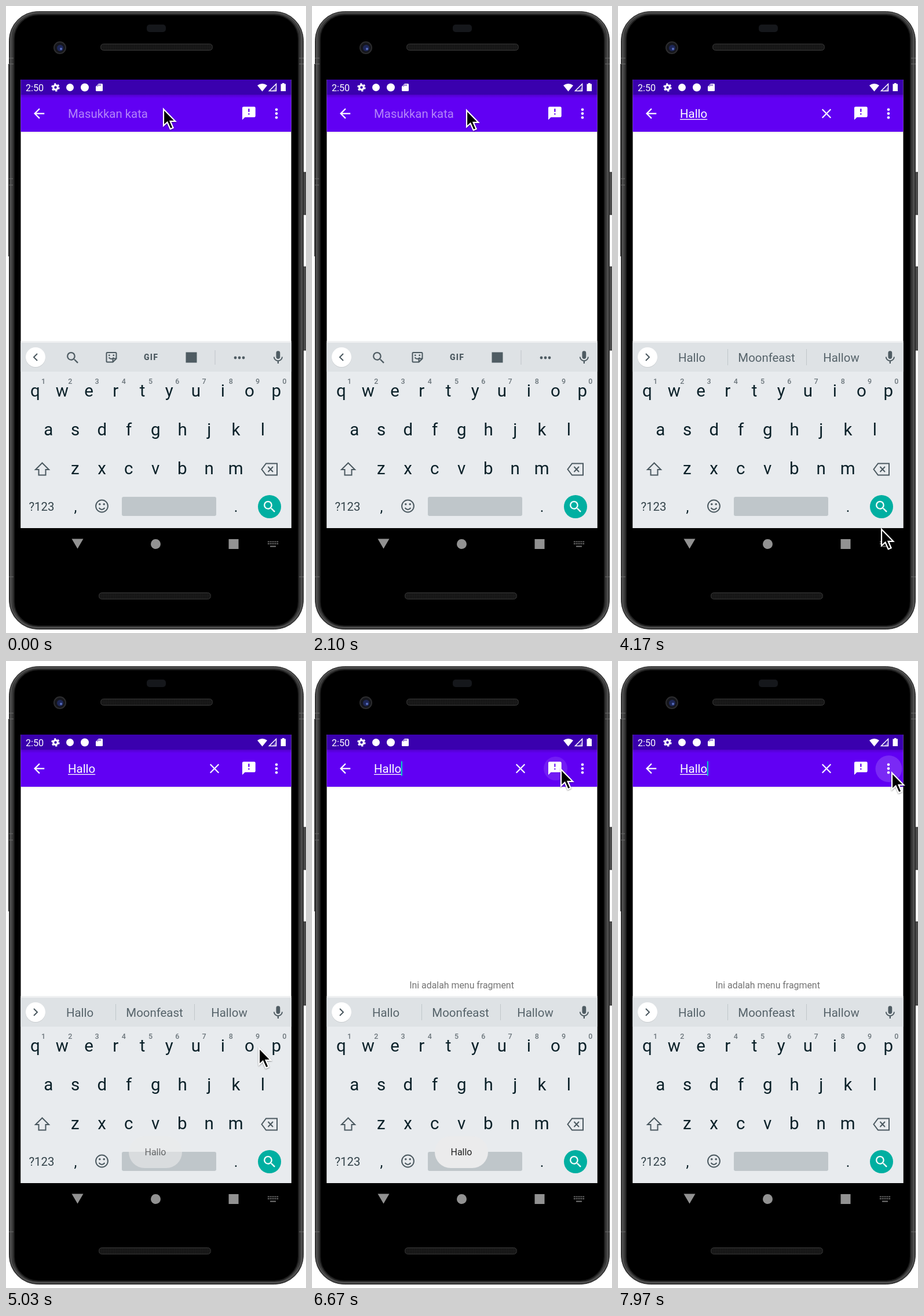
An HTML page that plays this animation: 518x1082 px, repeating every 8 s.

```html
<!DOCTYPE html>
<html lang="id">
<head>
<meta charset="utf-8">
<title>Search menu demo</title>
<style>
html, body { margin: 0; width: 100%; height: 100%; overflow: hidden; background: #fff; }
svg { display: block; width: 518px; height: 1082px; font-family: Roboto, sans-serif; }
.mid { text-anchor: middle; }
.key { font-size: 29.5px; fill: #0b2129; text-anchor: middle; }
.num { font-size: 12.5px; font-weight: 500; fill: #6b757b; text-anchor: middle; }
.sug { font-size: 20.4px; fill: #56636a; text-anchor: middle; }
.line { fill: none; stroke: #4b5960; stroke-width: 2; }
.ico { fill: #4f5c63; }
</style>
</head>
<body>
<svg viewBox="0 0 518 1082" xmlns="http://www.w3.org/2000/svg">
  <defs>
    <linearGradient id="side" x1="5" x2="514" y1="0" y2="0" gradientUnits="userSpaceOnUse">
      <stop offset="0" stop-color="#191919"/><stop offset=".006" stop-color="#4c4c4c"/>
      <stop offset=".014" stop-color="#333"/><stop offset=".02" stop-color="#3c3c3c"/>
      <stop offset=".98" stop-color="#3c3c3c"/><stop offset=".986" stop-color="#333"/>
      <stop offset=".994" stop-color="#4c4c4c"/><stop offset="1" stop-color="#191919"/>
    </linearGradient>
    <linearGradient id="shade" x1="0" x2="0" y1="0" y2="1">
      <stop offset="0" stop-color="#000" stop-opacity=".16"/><stop offset="1" stop-color="#000" stop-opacity="0"/>
    </linearGradient>
    <pattern id="mesh" width="3" height="3" patternUnits="userSpaceOnUse">
      <rect width="3" height="3" fill="#1b1b1b"/><circle cx="1.5" cy="1.5" r=".8" fill="#0a0a0a"/>
    </pattern>
    <path id="glass" d="M15.5 14h-.79l-.28-.27A6.47 6.47 0 0 0 16 9.5 6.5 6.5 0 1 0 9.5 16c1.61 0 3.09-.59 4.23-1.57l.27.28v.79l5 4.99L20.49 19l-4.99-5zm-6 0a4.5 4.5 0 1 1 0-9 4.5 4.5 0 0 1 0 9z"/>
  </defs>

  <!-- phone -->
  <rect x="511" y="287" width="9" height="73" rx="2" fill="#4b4b4b" stroke="#222"/>
  <rect x="511" y="450" width="9" height="144" rx="2" fill="#4b4b4b" stroke="#222"/>
  <rect x="4" y="100" width="3" height="332" fill="#2c2c2c"/>
  <rect x="5.5" y="9.5" width="508" height="1066" rx="50" fill="url(#side)" stroke="#2a2a2a"/>
  <rect x="8" y="11.5" width="503" height="1061" rx="47" fill="none" stroke="#565656" stroke-width="1.5"/>
  <path d="M5 90h8M5 100h8M506 90h8M506 100h8M5 298h7M5 309h7M5 985h8M506 985h8" stroke="#6d6d6d"/>
  <rect x="14" y="15" width="491" height="1055" rx="42" stroke="#1d1d1d" stroke-width="2"/>
  <rect x="243" y="32" width="33" height="13" rx="5" fill="#15171b"/>
  <rect x="163.500" y="65.500" width="193" height="11" rx="5" fill="url(#mesh)" stroke="#373737"/>
  <rect x="160.500" y="1012.500" width="193" height="11" rx="5" fill="url(#mesh)" stroke="#373737"/>
  <circle cx="93" cy="72" r="10" fill="#15161c" stroke="#2c2c2e" stroke-width="2"/>
  <circle cx="93.500" cy="72.500" r="5.500" fill="#1e2757"/>
  <circle cx="95" cy="74" r="2" fill="#5a6fc0"/>

  <!-- app -->
  <rect x="25.500" y="127" width="467" height="774" fill="#fff"/>
  <rect x="25.500" y="153" width="467" height="64" fill="#6100f3"/>
  <rect x="25.500" y="127" width="467" height="26" fill="#3a00ae"/>
  <rect x="25.500" y="153" width="467" height="6" fill="url(#shade)"/>
  <rect x="25.500" y="217" width="467" height="3" fill="url(#shade)" opacity=".5"/>
  <text x="34" y="146.500" font-size="16.200" fill="#fff">2:50</text>
  <g fill="#fff">
    <circle cx="85.500" cy="140.500" r="3.800" fill="none" stroke="#fff" stroke-width="3.200"/>
    <circle cx="85.500" cy="140.500" r="6.200" fill="none" stroke="#fff" stroke-width="2" stroke-dasharray="3.250 3.243"/>
    <circle cx="110.500" cy="140.500" r="6.500"/>
    <circle cx="136" cy="140.500" r="7"/>
    <path d="M160 134h5.500q1.500 0 1.500 1.500v10q0 1.500-1.500 1.500h-9q-1.500 0-1.500-1.500v-6.500z"/>
    <path d="M434 137q8.500-6 17 0l-8.500 10.500z"/>
    <path d="M454.500 146.500h12v-12z" fill="none" stroke="#fff" stroke-width="1.500"/>
    <path d="M459 147.200h8v-8z" opacity=".4"/>
    <path d="M477 133h3.500v1.500h2.500v12.500h-8.500v-12.500h2.500z"/>
  </g>
  <path d="M158 136v3M160.500 135v3M163 135v3" stroke="#3a00ae"/>
  <circle id="tap" fill="#fff"/>
  <g fill="#fff">
    <path transform="translate(43.500 171.900) scale(1.137)" d="M20 11H7.830l5.590-5.590L12 4l-8 8 8 8 1.410-1.410L7.830 13H20z"/>
    <path transform="translate(405.700 171.500) scale(1.137)" fill-rule="evenodd" d="M20 2H4a2 2 0 0 0-2 2v18l4-4h14a2 2 0 0 0 2-2V4a2 2 0 0 0-2-2zM13 14h-2v-2h2zM13 10h-2V5h2z"/>
    <circle cx="467" cy="178.700" r="2.300"/><circle cx="467" cy="185.600" r="2.300"/><circle cx="467" cy="192.500" r="2.300"/>
  </g>
  <path id="clear" d="M352.700 178.300l14.600 14.600M367.300 178.300l-14.600 14.600" stroke="#fff" stroke-width="2.100"/>
  <text id="hint" x="107" y="193" font-size="20.400" fill="#fff" opacity=".52">Masukkan kata</text>
  <text id="query" x="107" y="193" font-size="20.400" fill="#fff"></text>
  <rect id="under" x="107" y="195" height="1.300" fill="#fff"/>
  <rect id="caret" y="173" width="2" height="25" fill="#04d5c4"/>
  <text id="page" class="mid" x="258.500" y="565" font-size="15.900" fill="#747474">Ini adalah menu fragment</text>

  <!-- keyboard -->
  <rect x="25.500" y="578" width="467" height="3" fill="#f0f1f2"/>
  <rect x="25.500" y="581" width="467" height="320" fill="#e8ebee"/>
  <rect x="25.500" y="581" width="467" height="50" fill="#dee2e5"/>
  <circle cx="51" cy="607" r="17" fill="#c9cdd0"/>
  <circle cx="51" cy="606" r="17" fill="#fff"/>
  <path id="chev" class="line"/>
  <g id="tools" class="ico">
    <use href="#glass" transform="translate(101.600 593.500) scale(1.137)"/>
    <path class="line" d="M175 598h14q1.500 0 1.500 1.500v9l-6 6h-9.500q-1.500 0-1.500-1.500v-13.500q0-1.500 1.500-1.500zM190 608.500h-5.500v6M177.500 606.500q4.500 5 8.500 0"/>
    <path d="M177 601.500h2.500v2.500h-2.500zM184.500 601.500h2.500v2.500h-2.500z"/>
    <text class="mid" x="250.500" y="611" font-size="14" font-weight="900" letter-spacing="1.200">GIF</text>
    <rect x="310.500" y="597.500" width="19" height="18"/>
    <path d="M361 594v25" stroke="#bfc5c9"/>
    <circle cx="396" cy="607" r="2.400"/><circle cx="403" cy="607" r="2.400"/><circle cx="410" cy="607" r="2.400"/>
  </g>
  <g id="words">
    <path d="M189.500 592v28M325.500 592v28" stroke="#c0c6ca"/>
    <text class="sug" x="127.500" y="614"></text>
    <text class="sug" x="256.500" y="614"></text>
    <text class="sug" x="385.500" y="614"></text>
  </g>
  <path class="ico" transform="translate(456.200 593) scale(1.137)" d="M12 14a3 3 0 0 0 3-3V5a3 3 0 0 0-6 0v6a3 3 0 0 0 3 3zm5.300-3c0 3-2.540 5.100-5.300 5.100S6.700 14 6.700 11H5c0 3.410 2.720 6.230 6 6.720V21h2v-3.280c3.280-.48 6-3.300 6-6.720z"/>
  <g id="keys"></g>
  <path class="line" d="M62.500 788.500l-11.500 11.500h5.500v9.500h12v-9.500h5.500z"/>
  <path class="line" d="M449 789.500h19v20h-19l-7.500-10zM452.500 795l8.500 9M461 795l-8.500 9"/>
  <text class="mid" x="61.500" y="870.500" font-size="20.400" fill="#33434a">?123</text>
  <text class="key" x="120" y="873" style="font-size:25px">,</text>
  <text class="key" x="397" y="873" style="font-size:25px">.</text>
  <circle class="line" cx="165.500" cy="863" r="10.400"/>
  <path class="line" d="M160.500 866q5 6 10 0"/>
  <circle class="ico" cx="161.800" cy="859.800" r="1.800"/><circle class="ico" cx="169.200" cy="859.800" r="1.800"/>
  <rect x="200" y="847" width="163" height="33" rx="3" fill="#bfc6ca"/>
  <circle cx="455" cy="864" r="20" fill="#00afa1"/>
  <use href="#glass" fill="#fff" transform="translate(441.600 850.500) scale(1.137)"/>
  <g id="toast">
    <rect x="212" y="820" width="92" height="55" rx="27.500" fill="#ebebec"/>
    <text class="mid" x="258" y="852.500" font-size="15.900" fill="#222">Hallo</text>
  </g>

  <!-- navigation -->
  <g fill="#929292">
    <path d="M113.500 919.500h20l-10 17z"/><circle cx="258.500" cy="928.500" r="8.500"/>
    <rect x="384.500" y="920" width="17" height="17"/>
  </g>
  <path d="M452 924.500h18M452 928h18" stroke="#777" stroke-width="2" stroke-dasharray="2 1.200"/>
  <path d="M456 932.500h10" stroke="#777" stroke-width="2"/>

  <path id="mouse" d="M0 0V28.500L6.500 22.500L11.700 34.300L16.600 32.200L11.600 20.800H20.300Z" stroke="#fff" stroke-width="2.200" style="filter:drop-shadow(0 1px 1px #0006)"/>
</svg>
<script>
const $ = id => document.getElementById(id);
const LOOP = 8000;

function key(cls, x, y, s) {
  const el = document.createElementNS("http://www.w3.org/2000/svg", "text");
  el.setAttribute("class", cls);
  el.setAttribute("x", x);
  el.setAttribute("y", y);
  el.textContent = s;
  $("keys").append(el);
}
[["qwertyuiop", 50.5, 674], ["asdfghjkl", 73.3, 741], ["zxcvbnm", 119.3, 807.5]].forEach(([row, x, y]) =>
  [...row].forEach((c, i) => key("key", x + i * 46.25, y, c)));
[..."1234567890"].forEach((c, i) => key("num", 64.5 + i * 46.25, 652, c));

const typed = [[2600, "H"], [2790, "Ha"], [2960, "Hal"], [3220, "Hall"], [3500, "Hallo"]];
const bars = [[2860, ["Ha", "Have", "Had"]], [3300, ["Hallo", "Moonfeast", "Hallow"]]];
// time, x, y of the pointer tip
const path = [
  [0, 272, 178], [500, 272, 178], [900, 267, 180], [3450, 267, 180],
  [3900, 462, 929], [4050, 459, 922], [4170, 455, 903], [4420, 464, 868], [4720, 464, 866],
  [5030, 437, 668], [5600, 432, 192], [5800, 430, 187], [6780, 430, 187], [7250, 473, 193], [8000, 473, 193]
];
// press time, release time, centre, final radius, strength
const taps = [[6430, 6620, 420.5, 185.5, 20.5, .13], [7640, 8000, 467.5, 186, 23, .16]];

const clamp = v => Math.max(0, Math.min(1, v));
const ramp = (t, a, b) => clamp((t - a) / (b - a));
const ease = u => u * u * (3 - 2 * u);
const last = (list, t) => list.reduce((v, [at, x]) => t >= at ? x : v, null);
const show = (id, on) => $(id).setAttribute("visibility", on ? "visible" : "hidden");
const set = (id, o) => { for (const k in o) $(id).setAttribute(k, o[k]); };

function pointer(t) {
  const i = Math.max(1, path.findIndex(p => p[0] > t));
  const [a, b] = [path[i - 1], path[i]];
  const u = ease(ramp(t, a[0], b[0]));
  return [a[1] + (b[1] - a[1]) * u, a[2] + (b[2] - a[2]) * u];
}

function caretOn(t) {
  if (t < 2600) return (t + 700) % 1000 < 500;
  return t < 3500 || (t - 3500) % 1000 < 500;
}

function draw(t) {
  const text = last(typed, t) || "";
  const words = last(bars, t);
  $("query").textContent = text;
  const w = text ? $("query").getComputedTextLength() : 0;
  set("under", { width: w });
  set("caret", { x: 107 + Math.max(0, w - .3) });
  show("caret", caretOn(t));
  show("hint", !text);
  show("clear", text);

  show("tools", !words);
  show("words", words);
  if (words) document.querySelectorAll(".sug").forEach((el, i) => el.textContent = words[i]);
  set("chev", { d: words ? "M48 600l6 6-6 6" : "M54 600l-6 6 6 6" });

  show("page", t >= 6560);
  set("toast", { opacity: ramp(t, 4850, 5150) * (1 - ramp(t, 6960, 7260)) });

  const tap = taps.find(p => t >= p[0] && t < p[1] + 300);
  show("tap", tap);
  if (tap) {
    const [at, up, cx, cy, r, op] = tap;
    set("tap", { cx, cy, r: r * (.4 + .6 * ease(ramp(t, at, at + 225))),
      opacity: op * ramp(t, at, at + 75) * (1 - ramp(t, up, up + 300)) });
  }
  set("mouse", { transform: `translate(${pointer(t)})` });
}

function tick() {
  draw(performance.now() % LOOP);
  requestAnimationFrame(tick);
}
tick();
</script>
</body>
</html>
```
